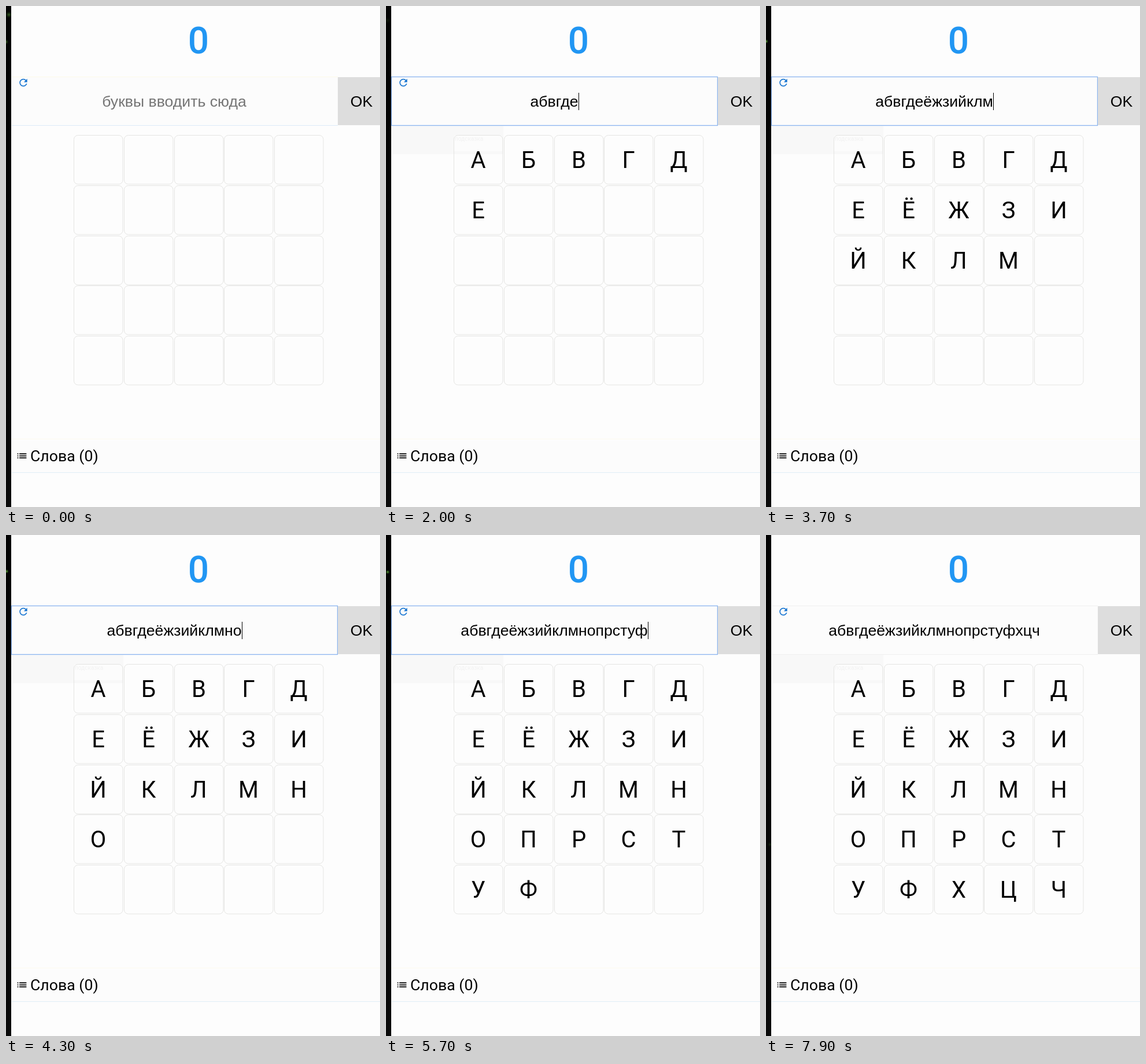
An HTML page with a canvas for the animation above (8 s loop, 647 px wide and 866 px high).

```html
<!DOCTYPE html>
<html lang="ru">
<head>
<meta charset="utf-8">
<title>Слова</title>
<style>
html, body { margin: 0; width: 100%; height: 100%; overflow: hidden; background: #fdfdfd; }
canvas { display: block; }
</style>
</head>
<body>
<canvas id="stage" width="647" height="866"></canvas>
<script>
const ctx = document.getElementById('stage').getContext('2d');
const LOOP = 8000, FOCUS = 100, BLUR = 7800;
const LETTERS = 'абвгдеёжзийклмнопрстуфхцч';
// Time of each key press, ms
const KEYS = [800, 1000, 1200, 1500, 1700, 1900, 2100, 2500, 2700, 2900, 3100, 3200, 3400,
  3700, 3900, 4200, 4400, 4600, 4800, 5000, 5300, 5600, 5800, 6000, 6100];
const ARIAL = '26.67px "Liberation Sans", Arial, sans-serif';
const ROBOTO = 'Roboto, sans-serif';
const REFRESH = new Path2D('M17.65 6.35C16.2 4.9 14.21 4 12 4c-4.42 0-7.99 3.58-7.99 8s3.57 8 7.99 8c3.73 0 6.84-2.55 7.73-6h-2.08c-.82 2.33-3.04 4-5.65 4-3.31 0-6-2.69-6-6s2.69-6 6-6c1.66 0 3.14.69 4.22 1.78L13 11h7V4z');
const LIST = new Path2D('M3 11h2v2H3zM3 15h2v2H3zM3 7h2v2H3zM7 11h14v2H7zM7 15h14v2H7zM7 7h14v2H7z');

function rect(x, y, w, h, color) {
  ctx.fillStyle = color;
  ctx.fillRect(x, y, w, h);
}

function text(str, x, y, font, color = '#000', align = 'center') {
  ctx.font = font;
  ctx.fillStyle = color;
  ctx.textAlign = align;
  ctx.fillText(str, x, y);
}

function icon(path, cx, cy, size, color) {
  ctx.save();
  ctx.translate(cx - size / 2, cy - size / 2);
  ctx.scale(size / 24, size / 24);
  ctx.fillStyle = color;
  ctx.fill(path);
  ctx.restore();
}

function glow(x, y, r, alpha) {
  const g = ctx.createRadialGradient(x, y, 0, x, y, r);
  g.addColorStop(0, `rgba(110,190,70,${alpha})`);
  g.addColorStop(1, 'rgba(20,60,10,0)');
  rect(x - r, y - r, 2 * r, 2 * r, g);
}

// Dark strip of the backdrop with drifting green lights
function strip(t) {
  const g = ctx.createLinearGradient(0, 0, 0, 866);
  g.addColorStop(0, '#020202');
  g.addColorStop(1, '#090909');
  rect(0, 0, 9, 866, g);
  if (t < 600) glow(0, 62, 5, 0.5);
  if (t < 2300) glow(5 - t / 1000, 15 + t / 200, 6, 0.5 * (1 - t / 2600));
  if (t > 3300 && t < 6800) {
    const x = t < 5700 ? (t - 3300) / 800 : 3 - (t - 5700) / 360;
    glow(x, 60 + Math.min(4, (t - 3300) / 350), 4, 0.9);
  }
  if (t >= 7000) glow(7, 535, 5, 0.18);
  rect(9, 0, 638, 866, '#fdfdfd');
}

function field(t, typed) {
  const focused = t >= FOCUS && t < BLUR;
  rect(10, 123, 564, 83, '#fcfcfc');
  if (focused) {
    ctx.strokeStyle = '#8ab4f0';
    ctx.lineWidth = 1.3;
    ctx.strokeRect(9.5, 122.5, 564, 84);
  } else {
    rect(10, 122, 564, 1, t < FOCUS ? '#fdfae8' : '#f0f0f0');
    rect(10, 206, 564, 1, t < FOCUS ? '#dcebf8' : '#efefef');
  }
  const str = LETTERS.slice(0, typed);
  text(str || 'буквы вводить сюда', 291, 174, ARIAL, str ? '#000' : '#757575');
  const since = t - (typed ? KEYS[typed - 1] : FOCUS);
  if (focused && since % 1000 < 500) {
    const w = str ? ctx.measureText(str).width : 0;
    rect(Math.round(291 + w / 2), 150, 1, 30, '#000');
  }
  rect(574, 123, 73, 83, '#ddd');
  text('OK', 615, 174, ARIAL);
  icon(REFRESH, 30, 132.5, 20, '#1976d2');
}

function hint() {
  rect(10, 207, 193, 49, '#f8f8f8');
  rect(118, 224, 83, 27, '#fcfcfc');
  text('подсказка', 119, 233, '10px ' + ROBOTO, '#f2f2f2', 'left');
}

function grid(typed) {
  ctx.lineWidth = 1;
  for (let i = 0; i < 25; i++) {
    const x = Math.round(117 + (i % 5) * 86.8), y = Math.round(223 + Math.floor(i / 5) * 86.8);
    ctx.strokeStyle = '#e5e5e3';
    ctx.beginPath();
    ctx.roundRect(x + 0.5, y + 0.5, 84.5, 84.5, 7);
    ctx.stroke();
    if (i < typed) text(LETTERS[i].toUpperCase(), x + 42.5, y + 57, '40px ' + ROBOTO);
  }
}

function words() {
  rect(9, 748, 638, 1, '#fdfbef');
  rect(10, 752, 637, 54, '#fcfcfc');
  rect(10, 806, 637, 1, '#e0eef6');
  icon(LIST, 27.5, 777.5, 21, '#000');
  text('Слова (0)', 42, 787, '26.67px ' + ROBOTO, '#000', 'left');
}

function draw(now) {
  const t = now % LOOP;
  const typed = KEYS.filter(k => k <= t).length;
  strip(t);
  text('0', 333, 82, '500 64px ' + ROBOTO, '#2196f3');
  if (t >= FOCUS) hint();
  field(t, typed);
  grid(typed);
  words();
  requestAnimationFrame(draw);
}
requestAnimationFrame(draw);
</script>
</body>
</html>
```
